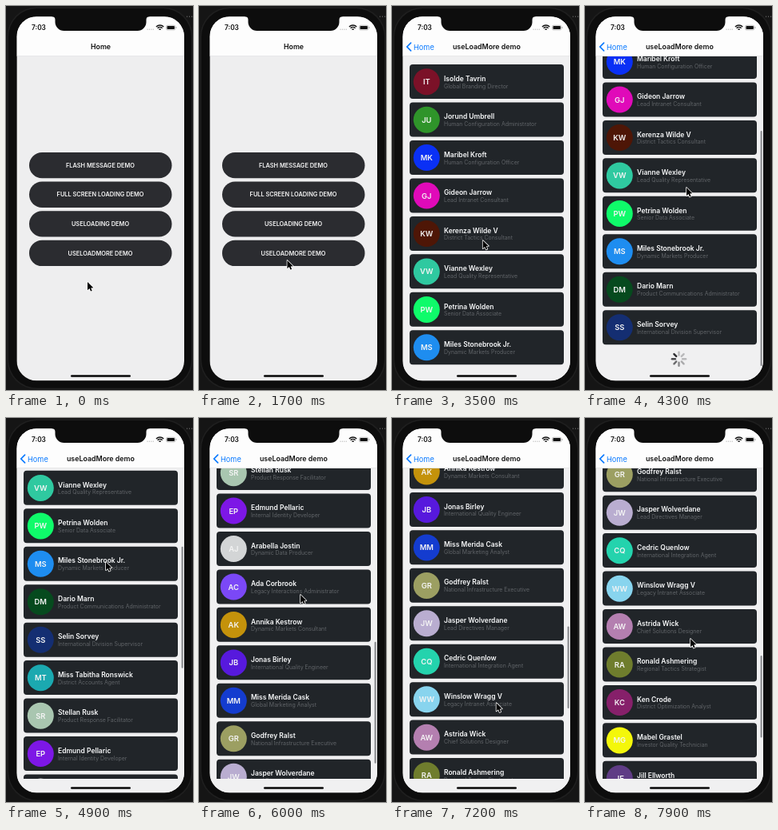
Animation, 234 px wide and 480 px high, one loop 8000 ms. Source, as an HTML page with a canvas:

```html
<!DOCTYPE html>
<html lang="en">
<head>
<meta charset="utf-8">
<title>useLoadMore demo</title>
<style>
  html, body { margin: 0; width: 100%; height: 100%; overflow: hidden; background: #151515; }
  canvas { display: block; width: 234px; height: 480px; }
</style>
</head>
<body>
<canvas id="stage"></canvas>
<script>
const W = 234, H = 480, LOOP = 8000, STEP = 100;
const FONT = 'Inter, Roboto, "Liberation Sans", sans-serif';
const INK = '#111', BLUE = '#0a7aff';
const SCREEN = { x: 13.4, y: 13.2, w: 209.6, h: 455.2 };
const LIST = { top: 63, height: 388 };
const PITCH = 47.45, FIRST = 94.7, PAGE = 10, FIRST_MAX = 120;
const PRESS = 2100, LOADS = [4600, 6900];

const canvas = document.getElementById('stage');
const ctx = canvas.getContext('2d');
const dpr = window.devicePixelRatio || 1;
canvas.width = W * dpr;
canvas.height = H * dpr;

const buttons = ['FLASH MESSAGE DEMO', 'FULL SCREEN LOADING DEMO', 'USELOADING DEMO', 'USELOADMORE DEMO'];

const people = `
Isolde Tavrin|Global Branding Director|#7b1128
Jorund Umbrell|Human Configuration Administrator|#2f942a
Maribel Kroft|Human Configuration Officer|#0a30f5
Gideon Jarrow|Lead Intranet Consultant|#e00ab9
Kerenza Wilde V|District Tactics Consultant|#4e1606
Vianne Wexley|Lead Quality Representative|#2fc9a0
Petrina Wolden|Senior Data Associate|#0ffb6a
Miles Stonebrook Jr.|Dynamic Markets Producer|#1e8df0
Dario Marn|Product Communications Administrator|#064a1e
Selin Sorvey|International Division Supervisor|#142e72
Miss Tabitha Ronswick|District Accounts Agent|#1ba9b0
Stellan Rusk|Product Response Facilitator|#a9c6b0
Edmund Pellaric|Internal Identity Developer|#7d17e6
Arabella Jostin|Dynamic Data Producer|#d3d5d6
Ada Corbrook|Legacy Interactions Administrator|#7b48f7
Annika Kestrow|Dynamic Markets Consultant|#c4920b
Jonas Birley|International Quality Engineer|#5719dd
Miss Merida Cask|Global Marketing Analyst|#143ccf
Godfrey Ralst|National Infrastructure Executive|#9c9f62
Jasper Wolverdane|Lead Directives Manager|#b9add0
Cedric Quenlow|International Integration Agent|#24d3ad
Winslow Wragg V|Legacy Intranet Associate|#88d4ee
Astrida Wick|Chief Solutions Designer|#b47fb0
Ronald Ashmering|Regional Tactics Strategist|#6f7d2d
Ken Crode|District Optimization Analyst|#86206a
Mabel Grastel|Investor Quality Technician|#f4f70a
Jill Ellworth|Senior Program Planner|#5f3c85`.trim().split('\n').map(line => {
  const [name, job, color] = line.split('|');
  return { name, job, color, initials: name.split(' ').slice(0, 2).map(w => w[0]).join('') };
});

// Each swipe drags the list to `scroll`, then lets it glide on.
const swipes = [
  { from: 4100, to: 4300, x: 127, y: 227, scroll: 120, glide: 0 },
  { from: 4700, to: 4900, x: 125, y: 180, scroll: 244.5, glide: 195 },
  { from: 5700, to: 6000, x: 127, y: 221, scroll: 548, glide: 46 },
  { from: 6400, to: 6600, x: 128.5, y: 293, scroll: 627, glide: 130 },
  { from: 7600, to: 7900, x: 132, y: 276, scroll: 878, glide: 0 }
];

const clamp = v => Math.min(1, Math.max(0, v));
const mix = (a, b, k) => a + (b - a) * k;
const progress = (t, { from, to }) => clamp((t - from) / (to - from));
const smooth = k => k * k * (3 - 2 * k);

function scrollAt(t) {
  let pos = 0;
  for (const [i, s] of swipes.entries()) {
    if (t < s.from) break;
    pos = mix(pos, s.scroll, progress(t, s));
    const next = swipes[i + 1];
    const rest = Math.min(t, next ? next.from : LOOP) - s.to;
    if (rest > 0) pos += s.glide * (1 - Math.exp(-rest / 300));
  }
  return pos;
}

const legs = [
  { from: 1400, to: 1800, x: 112, y: 313 },
  { from: 2300, to: 2500, x: 109, y: 274 }
];
for (const s of swipes) {
  const begin = Math.max(legs[legs.length - 1].to, s.from - 900);
  const drag = s.scroll - scrollAt(s.from);
  legs.push({ from: begin, to: s.from, x: s.x, y: s.y + drag }, s);
}

function cursorAt(t) {
  return legs.reduce((p, leg) => {
    const k = smooth(progress(t, leg));
    return { x: mix(p.x, leg.x, k), y: mix(p.y, leg.y, k) };
  }, { x: 102, y: 345 });
}

// Critically damped spring.
function pushAt(t) {
  const a = Math.max(0, t - PRESS - 50) * .0149;
  const p = 1 - (1 + a) * Math.exp(-a);
  return p > .998 ? 1 : p;
}

function box(x, y, w, h, r, fill) {
  ctx.beginPath();
  ctx.roundRect(x, y, w, h, r);
  ctx.fillStyle = fill;
  ctx.fill();
}

function text(str, x, y, size, weight, color, align = 'left') {
  ctx.font = `${weight} ${size}px ${FONT}`;
  ctx.fillStyle = color;
  ctx.textAlign = align;
  ctx.fillText(str, x, y);
}

function line(points, width, color, cap = 'round') {
  ctx.beginPath();
  points.forEach(([x, y]) => ctx.lineTo(x, y));
  ctx.lineWidth = width;
  ctx.lineCap = cap;
  ctx.strokeStyle = color;
  ctx.stroke();
}

function clipped({ x, y, w, h }, r, draw) {
  ctx.save();
  ctx.beginPath();
  ctx.roundRect(x, y, w, h, r);
  ctx.clip();
  draw();
  ctx.restore();
}

function shifted(dx, draw) {
  ctx.save();
  ctx.translate(dx, 0);
  draw();
  ctx.restore();
}

function drawHome(pressed) {
  buttons.forEach((label, i) => {
    const y = 183 + i * 36.6;
    ctx.globalAlpha = pressed && i === 3 ? .45 : 1;
    box(29, y, 178.5, 32.3, 16.1, '#2b2c30');
    text(label, 118, y + 18.8, 7.4, 600, '#f4f4f4', 'center');
    ctx.globalAlpha = 1;
  });
}

function drawSpinner(x, y, t) {
  const lead = Math.floor(t / 100) + 4;
  for (let i = 0; i < 8; i++) {
    const a = i * Math.PI / 4 - Math.PI / 2;
    const age = (lead - i) % 8;
    const spoke = [4.6, 8.6].map(r => [x + Math.cos(a) * r, y + Math.sin(a) * r]);
    line(spoke, 2.4, `rgba(45,45,48,${Math.max(.28, 1 - age * .16)})`);
  }
}

function drawCard({ initials, name, job, color }, y) {
  box(22, y - 21.6, 193, 43, 4, '#212529');
  box(26.8, y - 16.5, 33, 33, 16.5, color);
  text(initials, 43.3, y + 3.5, 9.4, 600, '#f4f4f4', 'center');
  text(name, 65, y - .9, 8.5, 600, '#f8f9fa');
  text(job, 65, y + 7.9, 6.95, 400, '#606468');
}

function drawBar(scroll, rows) {
  const max = FIRST_MAX + (rows - PAGE) * PITCH;
  const scale = (LIST.height - 3) / (max + LIST.height);
  const over = Math.max(0, scroll - max);
  box(219.6, LIST.top + 2 + (scroll - over) * scale + over, 2, LIST.height * scale - over, 1, '#85868a');
}

function drawList(t) {
  const scroll = scrollAt(t);
  const rows = PAGE * (1 + LOADS.filter(at => t >= at).length);
  const rowY = i => FIRST + i * PITCH - scroll;
  clipped({ x: SCREEN.x, y: LIST.top, w: SCREEN.w, h: LIST.height }, 0, () => {
    people.slice(0, rows).forEach((p, i) => drawCard(p, rowY(i)));
    drawSpinner(117.5, rowY(rows) - 8, t);
    if (scroll > 0) drawBar(scroll, rows);
  });
}

function drawHeader(push) {
  const { x, y, w } = SCREEN;
  ctx.fillStyle = '#fdfdfd';
  ctx.fillRect(x, y, w, 62.5 - y);
  ctx.fillStyle = '#d9d9db';
  ctx.fillRect(x, 62.3, w, .5);

  const q = clamp(push * 1.035);
  ctx.globalAlpha = clamp(1 - q * 1.6);
  text('Home', 118.5 - 78 * q, 54, 8.8, 600, INK, 'center');
  if (q > 0) {
    ctx.globalAlpha = q;
    text('useLoadMore demo', mix(223, 118.4, q), 54.2, 8.85, 600, INK, 'center');
    text('Home', mix(105, 27, q), 54.7, 9.2, 400, BLUE);
    line([[23.6, 46.2], [18.8, 51], [23.6, 55.8]], 1.7, BLUE);
  }
  ctx.globalAlpha = 1;
}

function drawStatus() {
  text('7:03', 32, 30.2, 8.3, 600, INK);
  for (let i = 0; i < 4; i++) box(176.4 + i * 2.4, 28.6, 1.3, 1.3, .65, '#bbb');

  ctx.strokeStyle = ctx.fillStyle = INK;
  ctx.lineWidth = 1.4;
  ctx.lineCap = 'butt';
  for (const r of [6.6, 4.2, 1.6]) {
    ctx.beginPath();
    ctx.arc(192.6, 30.6, r, -Math.PI * .75, -Math.PI * .25);
    ctx.stroke();
  }

  ctx.beginPath();
  ctx.roundRect(200.6, 24.2, 11.2, 5.8, 1.6);
  ctx.strokeStyle = '#999';
  ctx.lineWidth = .6;
  ctx.stroke();
  box(201.5, 25.1, 9.4, 4, .8, INK);
  box(212.5, 26.1, .8, 2, .4, '#999');
}

function drawNotch() {
  const left = 61.5, right = 175.5, top = SCREEN.y, bottom = 31;
  ctx.beginPath();
  ctx.moveTo(left - 4, top - 1);
  ctx.lineTo(left - 4, top);
  ctx.arcTo(left, top, left, bottom, 4);
  ctx.arcTo(left, bottom, right, bottom, 11);
  ctx.arcTo(right, bottom, right, top, 11);
  ctx.arcTo(right, top, right + 4, top, 4);
  ctx.lineTo(right + 4, top - 1);
  ctx.fillStyle = '#0d0d0d';
  ctx.fill();
}

function drawScreen(t) {
  const push = pushAt(t);
  const { x, y, w, h } = SCREEN;
  ctx.fillStyle = '#eeeeef';
  ctx.fillRect(x, y, w, h);

  if (push < 1) {
    shifted(-.3 * w * push, () => drawHome(t >= PRESS));
    ctx.fillStyle = `rgba(0,0,0,${.1 * push})`;
    ctx.fillRect(x, y, w, h);
  }
  if (push > 0) {
    shifted(w * (1 - push), () => {
      ctx.fillStyle = '#f0f0f1';
      ctx.fillRect(x, y, w, h);
      drawList(t);
    });
  }
  drawHeader(push);
  drawStatus();
  box(81, 461.2, 75, 2.6, 1.3, '#060606');
}

function drawCursor(t) {
  const { x, y } = cursorAt(t);
  const arrow = [[0, 0], [0, 10.2], [2.4, 8], [4, 11.6], [5.7, 10.9], [4.2, 7.4], [7.3, 7.2], [0, 0]];
  ctx.lineJoin = 'round';
  line(arrow.map(([px, py]) => [x + px, y + py]), 1.5, '#fff');
  ctx.fillStyle = '#000';
  ctx.fill();
  ctx.lineJoin = 'miter';
}

function drawDevice() {
  ctx.fillStyle = '#151515';
  ctx.fillRect(0, 0, W, H);
  box(1.5, 1.5, 232, 477.5, 37, '#1f1f1f');
  box(3, 3, 229, 474.5, 35.5, '#0d0d0d');
  for (let i = 0; i < 3; i++) box(226 + i * 3, 12.6, 1.2, 1.2, .6, '#777');
}

function draw(t) {
  ctx.setTransform(dpr, 0, 0, dpr, 0, 0);
  drawDevice();
  clipped(SCREEN, 25, () => drawScreen(t));
  drawNotch();
  drawCursor(t);
}

const start = performance.now();
function tick() {
  const t = (performance.now() - start) % LOOP;
  draw(Math.floor(t / STEP) * STEP);
  requestAnimationFrame(tick);
}
tick();
</script>
</body>
</html>
```
